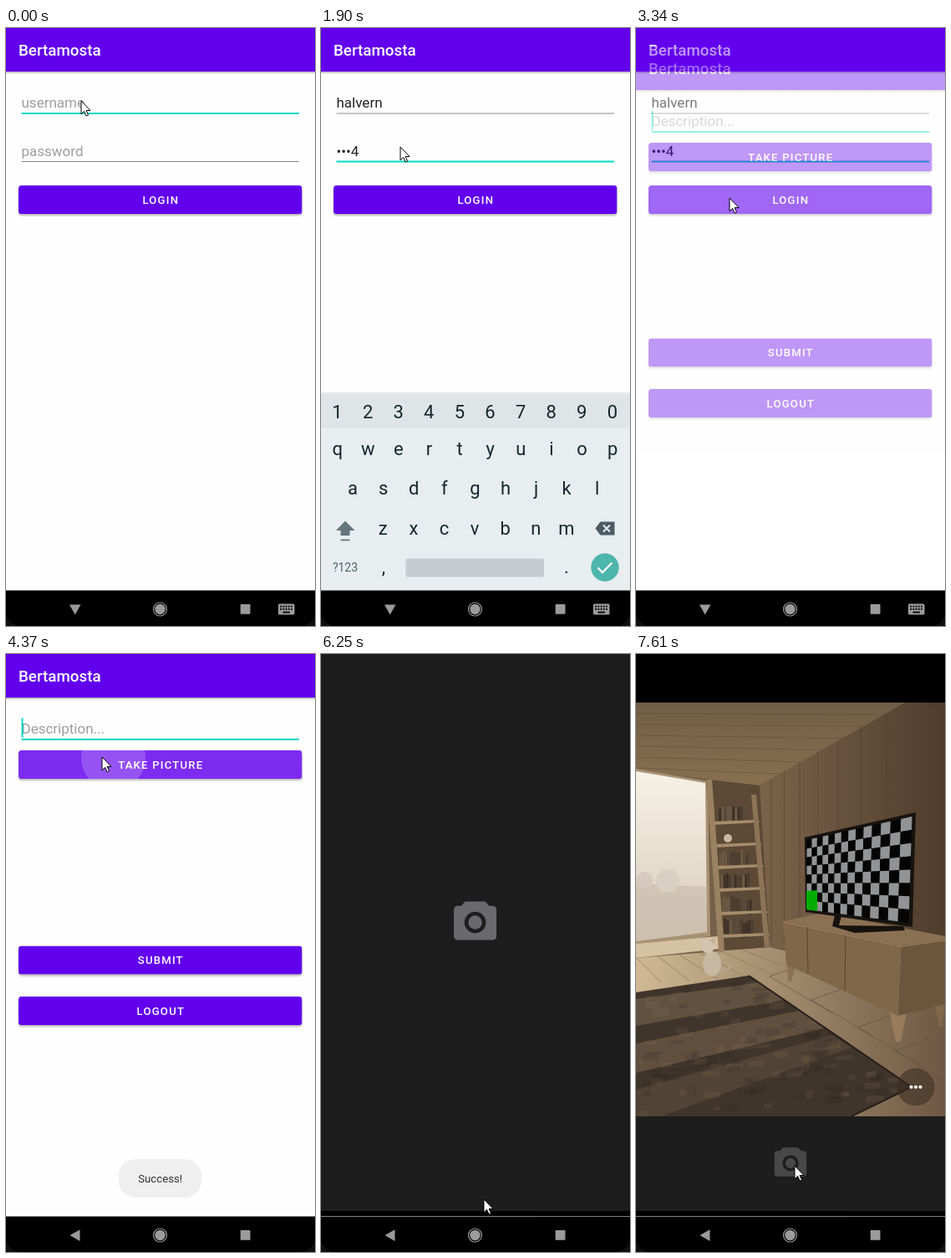
An HTML page for the animation above (8 s loop, 370 by 714 pixels).

```html
<!DOCTYPE html>
<html lang="en">
<head>
<meta charset="utf-8">
<title>Login and camera demo</title>
<style>
  html, body { margin: 0; width: 100%; height: 100%; overflow: hidden; background: #fff; }
  svg { display: block; width: 370px; height: 714px; font-family: Roboto, sans-serif; }
  .title { font-size: 18.8px; font-weight: 500; fill: #fff; }
  .field { font-size: 17px; white-space: pre; }
  .btn { font-size: 13.2px; font-weight: 500; letter-spacing: 1.18px; fill: #fff; text-anchor: middle; }
  .key { font-size: 22px; fill: #15272d; text-anchor: middle; }
  .sup { font-size: 9.5px; fill: #62737a; text-anchor: middle; }
  .sug { font-size: 17px; fill: #5b6a71; text-anchor: middle; }
</style>
</head>
<body>
<svg id="stage" viewBox="0 0 370 714" xmlns="http://www.w3.org/2000/svg"></svg>
<script>
const LOOP = 8000, PURPLE = "#6200ee", TEAL = "#03dac5";

// ---------- markup helpers ----------
const rect = (x, y, w, h, fill, extra = "") =>
  `<rect x="${x}" y="${y}" width="${w}" height="${h}" fill="${fill}" ${extra}/>`;
const poly = (points, fill, extra = "") => `<polygon points="${points}" fill="${fill}" ${extra}/>`;
const circle = (x, y, r, fill, extra = "") => `<circle cx="${x}" cy="${y}" r="${r}" fill="${fill}" ${extra}/>`;
const path = (d, stroke, width, fill = "none") =>
  `<path d="${d}" stroke="${stroke}" stroke-width="${width}" fill="${fill}"/>`;
const text = (x, y, cls, str, extra = "") => `<text x="${x}" y="${y}" class="${cls}" ${extra}>${str}</text>`;
const group = (id, body, extra = "") => `<g id="${id}" ${extra}>${body}</g>`;

let seed = 7;
const rnd = () => (seed = (seed * 16807) % 2147483647) / 2147483647;

// ---------- app screens ----------
const appBar = () =>
  rect(0, 0, 370, 671, "#fefefe") + rect(0, 50, 370, 5, "url(#shade)") +
  rect(0, 0, 370, 52, PURPLE) + text(15, 33, "title", "Bertamosta");

const field = (id, base) =>
  text(18.5, base, "field", "", `id="${id}"`) + rect(18.5, base + 6, 332.5, 2, TEAL, `id="${id}Line"`);

const button = (id, y, label) => `
  ${rect(15, y + 2, 339.5, 34, "#000", 'rx="3.5" opacity=".28" filter="url(#soft)"')}
  <clipPath id="${id}Clip">${rect(15, y, 339.5, 34, "#000", 'rx="3.5"')}</clipPath>
  <g clip-path="url(#${id}Clip)">
    ${rect(15, y, 339.5, 34, PURPLE)}
    ${rect(15, y, 339.5, 34, "#fff", `id="${id}Glow" opacity="0"`)}
    ${circle(128.5, y + 9, 0, "#fff", `id="${id}Ripple" opacity=".19"`)}
  </g>
  ${text(185.3, y + 21.9, "btn", label)}`;

// ---------- keyboard ----------
const STEP = 36.6;
const row = (chars, x0, y) => [...chars].map((c, i) => text(x0 + i * STEP, y, "key", c)).join("");

function keyboard() {
  const mic = rect(348.3, 449, 5.4, 10, "#56666d", 'rx="2.7"') +
    path("M345.5 456.5a5.5 5.5 0 0 0 11 0M351 462v4", "#56666d", 1.6);
  const smile = circle(111, 644, 8.6, "none", 'stroke="#4f6068" stroke-width="1.7"') +
    circle(108, 641.5, 1.4, "#4f6068") + circle(114, 641.5, 1.4, "#4f6068") +
    path("M106.5 646q4.5 5.5 9 0z", "none", 0, "#4f6068");
  const sups = [..."1234567890"].map((c, i) => text(32.5 + i * STEP, 494, "sup", c)).join("");
  const words = rect(130, 446, 1, 23, "#c3cacd") + rect(237, 446, 1, 23, "#c3cacd") +
    [82.5, 183.5, 284.5].map((x, i) => text(x, 464, "sug", "", `id="sug${i}"`)).join("");
  const letters = group("letters",
    rect(-12, 445.5, 31, 24, "#fff", 'rx="12"') + path("M6 452.5l5 5l-5 5", "#34454c", 2) +
    group("words", words) + mic + sups + smile + rect(138, 633.5, 129, 22, "#c6cbcf", 'rx="2"') +
    path("M331 644h12.5M338.5 638.5l5.5 5.5l-5.5 5.5M348.5 638v12", "#fff", 2.2));
  const digits = group("digits",
    row("1234567890", 19.5, 466) + rect(101.5, 633.5, 165.5, 22, "#c6cbcf", 'rx="2"') +
    path("M331.5 644.5l5.5 5.5l11.5 -11.5", "#fff", 2.3));
  return rect(0, 435, 370, 2, "#e9eaeb") + rect(0, 437, 370, 234, "#e8edf0") + rect(0, 437, 370, 41, "#dfe4e7") +
    row("qwertyuiop", 19.7, 510) + row("asdfghjkl", 38, 557) + row("zxcvbnm", 74.3, 605) +
    poly("29,588.5 40.5,600 34.5,600 34.5,606 23.5,606 23.5,600 18,600", "#65767e") +
    rect(23.5, 610.5, 11, 1.8, "#65767e") +
    poly("328.5,597.5 334.5,589.5 351.5,589.5 351.5,605.5 334.5,605.5", "#4b5b63") +
    path("M338 593.5l8 8m0-8l-8 8", "#e8edf0", 2) +
    text(29, 649, "key", "?123", 'style="font-size:14px;fill:#4f6068"') +
    text(75, 651, "key", ",") + text(294, 651, "key", ".") +
    circle(340, 644, 16.7, "#4db6ac") + letters + digits;
}

// ---------- camera ----------
const cameraIcon = (x, y, scale, id, fill, hole) =>
  `<g id="${id}" transform="translate(${x} ${y}) scale(${scale})" fill="${fill}">
    <path d="M-12 -25h24l4.8 5.2h4a4.7 4.7 0 0 1 4.7 4.7v31.5a4.7 4.7 0 0 1 -4.7 4.7h-41.600a4.700 4.700 0 0 1 -4.700 -4.700v-31.500a4.700 4.700 0 0 1 4.700 -4.700h4z"/>
    <circle r="12.8" fill="${hole}"/><circle r="8.200"/></g>`;

function shelf() {
  let s = poly("84,150 148,157 160,350 100,354", "#5c4936");
  for (const y of [201, 228, 254, 281, 309, 336]) {
    const l = 93 + (y - 200) * .07, r = 146 + (y - 200) * .09;
    if (y === 228) s += circle(110, 220, 5, "#c9b89c");
    else for (let x = l + 3; x < l + 38; x += 3.2)
      s += rect(x, y - 15 - rnd() * 5, 2.7, 18, ["#3c3028", "#4b3d31", "#6b5945", "#594a3a"][rnd() * 4 | 0]);
    s += poly(`${l},${y - 1} ${r},${y - 3} ${r + 2},${y} ${l},${y + 3}`, "#a68d6b");
  }
  return s + poly("84,150 91,150 106,355 99,357", "#9a8161") + poly("138,168 144,168 160,350 154,352", "#8d7456");
}

function screenTv() {
  const cols = 14, rows = 8, lh = 83, rh = 127;
  const at = (c, r) => {
    const u = c / cols, v = r / rows, s = u * lh / (u * lh + (1 - u) * rh);
    const top = 222 - 28 * s, bottom = 305 + 16 * s;
    return `${(204.5 + (126 - 4 * v) * s).toFixed(1)},${(top + (bottom - top) * v).toFixed(1)}`;
  };
  let s = poly("202,219 335,189 331,326 203,308", "#17130f");
  for (let c = 0; c < cols; c++) for (let r = 0; r < rows; r++)
    s += poly([at(c, r), at(c + 1, r), at(c + 1, r + 1), at(c, r + 1)].join(" "), (c + r) % 2 ? "#929394" : "#050505");
  return s + poly("204,283 217,282 217,307 204,305", "#00ad00") +
    poly("238,312 246,313 243,324 320,325 322,330 262,333 235,325", "#17120e");
}

function room() {
  let s = rect(0, 58, 370, 494, "#6d5741") +
    poly("0,58 322,58 148,157 0,139", "url(#ceil)") +
    poly("0,139 148,157 160,352 0,366", "#756049") +
    poly("148,157 322,58 370,58 370,350 160,352", "url(#wall)");
  for (let i = 1; i < 7; i++) s += path(`M0 ${58 + i * 13}L${322 - i * 25} ${58 + i * 14.2}`, "#5f4b38", .5);
  for (let i = 0; i < 9; i++) {
    const x = 162 + i * i * 1.5 + i * 14;
    s += path(`M${x} ${Math.max(58, 157 - (x - 148) * .57)}V345`, "#513f2f", .6);
  }
  // window and floor
  s += poly("0,137 86,152 89,337 0,349", "#a89274") + poly("0,140 83,154 85,332 0,343", "url(#win)") +
    poly("0,274 85,278 85,332 0,343", "#c3b6a6", 'opacity=".55"') +
    circle(10, 270, 10, "#d5cabd") + circle(38, 271, 14, "#d9cfc2") +
    poly("0,346 98,337 100,352 0,363", "#d5c2a2") +
    poly("0,363 160,350 370,400 370,552 0,552", "url(#floor)");
  for (let i = 0; i < 6; i++) s += path(`M${i * 25} ${362 - i * 2}l${30 + i * 9} 30`, "#8d7659", .7);
  for (const [x, y] of [[160, 385], [210, 413], [265, 446], [310, 474]])
    s += path(`M${x} ${y}l42 -15M${x} ${y}l75 44`, "#66523e", .7);
  s += shelf();
  // rug
  s += `<clipPath id="rugClip">${poly("0,404 135,384 330,517 258,552 0,552", "#000")}</clipPath><g clip-path="url(#rugClip)">` +
    rect(0, 380, 335, 172, "#40352b") +
    poly("0,412 150,392 184,412 0,444", "#695845", 'opacity=".8"') +
    poly("0,465 200,425 225,447 0,500", "#75624c", 'opacity=".6"') +
    poly("0,520 235,455 258,470 30,552 0,552", "#59493a", 'opacity=".7"');
  for (let i = 0; i < 150; i++)
    s += rect(rnd() * 320, 388 + rnd() * 160, 8 + rnd() * 14, 4 + rnd() * 6,
      rnd() < .5 ? "#8b765c" : "#211b17", 'opacity=".14" transform="skewY(-4)"');
  s += "</g>" + path("M135 384L330 517L258 552", "#261f19", 2);
  // small figure by the window
  s += path("M100 377q14 2 12-6", "#b4a48e", 3) + `<ellipse cx="91" cy="370" rx="11" ry="15" fill="#c7b8a2"/>` +
    circle(86, 349, 8, "#d2c4af") + poly("78,346 77,338 84,342", "#d2c4af") + poly("88,342 95,338 94,347", "#bfae97");
  // cabinet
  s += poly("181,368 191,373 186,391 182,391", "#8c7152") + poly("303,425 324,427 317,463 311,463", "#987b5b") +
    poly("357,418 370,414 367,445 363,445", "#80674a") +
    poly("176,319 225,309 370,337 370,342 318,348", "#8b7153") +
    poly("176,319 318,348 314,432 180,371", "#806749") +
    poly("318,348 370,341 370,418 314,432", "#6c553d") +
    path("M205 326l1 56M251 335l-1 67", "#58442f", 1) + path("M176 320L318 349L370 342", "#a18464", 1);
  return s + screenTv();
}

const cameraView = () => rect(0, 0, 370, 671, "#000") + rect(0, 0, 370, 665, "#1d1d1d") +
  cameraIcon(184.600, 320.500, 1, "cover", "#6a6a6e", "#1d1d1d");

const preview = () => rect(0, 0, 370, 665, "#000") +
  `<g clip-path="url(#picClip)">${room()}</g>` +
  circle(335, 517, 22.5, "#3a2d21", 'opacity=".55"') +
  [329.5, 335, 340.5].map(x => circle(x, 517, 2.1, "#fff")).join("") +
  rect(0, 552, 370, 113, "#1d1d1d", 'id="bar"') + cameraIcon(185, 608, .75, "shutter", "#484848", "#1d1d1d");

// ---------- system bar ----------
function navBar() {
  const g = "#9b9b9b";
  let keys = rect(326, 687.5, 19.5, 13, g, 'rx="1.5"');
  for (let r = 0; r < 2; r++) for (let c = 0; c < 5; c++) keys += rect(328.2 + c * 3.2, 689.7 + r * 3.2, 1.9, 1.9, "#000");
  keys += rect(331.5, 696.7, 8.500, 1.8, "#000");
  return rect(0, 671.500, 370, 43, "#000") +
    poly("76,688.5 89.500,688.5 82.700,700.500", g, 'id="down"') + poly("88.500,687.200 88.500,701 76.500,694", g, 'id="back"') +
    circle(184.5, 694, 8, "none", `stroke="${g}" stroke-width="1.2"`) + circle(184.5, 694, 6.2, g) +
    rect(280.700, 688, 11.8, 11.8, g, 'rx=".8"') + group("ime", keys) +
    path("M0 700q3 11 14 14h-14zM370 700q-3 11 -14 14h14z", "none", 0, "#101010");
}

const grad = (id, a, b, dir) => `<linearGradient id="${id}" ${dir}><stop stop-color="${a}"/><stop offset="1" stop-color="${b}"/></linearGradient>`;
const DOWN = 'x2="0" y2="1"', ACROSS = 'x2="1" y2="0"';

document.getElementById("stage").innerHTML = `<defs>
  ${grad("shade", "#777", "#fefefe", DOWN)}${grad("ceil", "#725d47", "#88704f", DOWN)}
  ${grad("wall", "#7b634a", "#4f3c2c", ACROSS)}${grad("win", "#f7f1e6", "#d8cbb8", DOWN)}
  ${grad("floor", "#d0b993", "#6e5843", ACROSS)}
  <filter id="soft" x="-5%" y="-30%" width="110%" height="160%"><feGaussianBlur stdDeviation="1"/></filter>
  <clipPath id="picClip">${rect(0, 58, 370, 494, "#000")}</clipPath>
  <clipPath id="appClip">${rect(0, 0, 370, 671.500, "#000")}</clipPath></defs>
  <g clip-path="url(#appClip)">
  ${group("loginView", appBar() + field("user", 95) + field("pass", 152.5) + button("login", 188, "LOGIN"))}
  ${group("kb", keyboard())}
  ${group("form", appBar() + field("desc", 95) + rect(18.5, 76.500, 2, 23, TEAL, 'id="caret"') +
    button("take", 115, "TAKE PICTURE") + button("submit", 348.5, "SUBMIT") + button("logout", 409, "LOGOUT"))}
  ${group("toast", rect(135, 603, 99, 46, "#efefef", 'rx="20"') +
    text(184.7, 631, "", "Success!", 'font-size="13.2" fill="#323232" text-anchor="middle"'))}
  ${group("cam", cameraView())}${group("photo", preview())}
  </g>${group("nav", navBar())}
  ${group("pointer", poly("0,0 0,15.8 3.6,12.4 6.2,18 8.6,16.9 6.1,11.5 11,11.5", "#fff", 'stroke="#000" stroke-width="1"'))}`;

// ---------- timeline: each step changes part of the state ----------
const steps = [
  [0, { user: "", pass: "", focus: "user", kb: 0, num: 0, ime: 1, x: 90, y: 87, login: 0, loginR: 0, form: 0, dy: 0,
        take: 0, takeR: 0, toast: 0, caret: 1, cam: 0, photo: 0, bar: "#1d1d1d", icon: "#e6e6e6" }],
  [310, { kb: 1 }],
  [440, { user: "h" }],
  [570, { user: "hal" }],
  [700, { user: "halve" }],
  [850, { user: "halvern" }],
  [1090, { x: 95, y: 142 }],
  [1240, { focus: "pass" }],
  [1370, { num: 1 }],
  [1500, { pass: "1" }],
  [1630, { pass: "•2" }],
  [1770, { pass: "••3" }],
  [1900, { pass: "•••4" }],
  [2190, { x: 102, y: 168 }],
  [2320, { x: 112, y: 203 }],
  [2440, { login: .06, loginR: 45 }],
  [2570, { login: .13, loginR: 0 }],
  [3070, { login: .05 }],
  [3200, { login: 0, kb: .5 }],
  [3330, { kb: 0, form: .4, dy: 22 }],
  [3470, { form: 1, dy: 0, ime: 0 }],
  [3600, { toast: .5, y: 180 }],
  [3740, { toast: .9, x: 114, y: 150 }],
  [3870, { toast: 1, y: 138 }],
  [4120, { x: 115, y: 123 }],
  [4240, { take: .1, takeR: 20 }],
  [4370, { take: .17, takeR: 38.5 }],
  [4490, { takeR: 90 }],
  [4800, { take: .07, takeR: 0 }],
  [5220, { x: 122, y: 170 }],
  [5350, { x: 145, y: 310 }],
  [5480, { x: 172, y: 480 }],
  [5620, { x: 188, y: 600 }],
  [5750, { x: 194, y: 640 }],
  [5880, { x: 195, y: 650, toast: .7 }],
  [6010, { toast: .3 }],
  [6130, { toast: 0, cam: .6 }],
  [6250, { cam: 1, y: 651 }],
  [6500, { photo: .35 }],
  [6640, { photo: .75, x: 194, y: 640 }],
  [6770, { photo: 1, x: 192, y: 626 }],
  [7070, { x: 190, y: 611 }],
  [7200, { bar: "#343434" }],
  [7340, { bar: "#2a2a2a", icon: "#a8a8a8" }],
  [7480, { bar: "#222222", icon: "#707070" }],
  [7610, { bar: "#1d1d1d", icon: "#484848" }]
];
let last = {};
const states = steps.map(([t, change]) => [t, last = { ...last, ...change }]);

// ---------- rendering ----------
const $ = id => document.getElementById(id);
const set = (id, attrs) => { for (const k in attrs) $(id).setAttribute(k, attrs[k]); };
const show = (id, on) => set(id, { opacity: +on });

function drawField(id, value, hint, base, focused) {
  $(id).textContent = value || hint;
  set(id, { fill: value ? "#212121" : "#9d9d9d" });
  set(id + "Line", { y: base + (focused ? 6 : 6.500), height: focused ? 2 : 1, fill: focused ? TEAL : "#8c8c8c" });
}

function draw(s) {
  const onUser = s.focus === "user";
  drawField("user", s.user, "username", 95, onUser);
  drawField("pass", s.pass, "password", 152.5, !onUser);
  drawField("desc", "", "Description...", 95, true);
  set("user", { "text-decoration": onUser && s.user ? "underline" : "none" });
  const cap = s.user.charAt(0).toUpperCase() + s.user.slice(1);
  [s.user, cap, cap + "'s"].forEach((w, i) => $("sug" + i).textContent = w);
  show("words", s.user);
  show("words", s.user.length > 0);
  show("letters", !s.num);
  show("digits", s.num);
  set("kb", { transform: `translate(0 ${(1 - s.kb) * 240})` });
  for (const b of ["login", "take"]) {
    set(b + "Glow", { opacity: s[b] });
    set(b + "Ripple", { r: s[b + "R"] });
  }
  show("form", s.form);
  set("form", { transform: `translate(0 ${s.dy})` });
  for (const id of ["toast", "caret", "cam", "photo", "ime"]) show(id, s[id]);
  show("down", s.ime);
  show("back", !s.ime);
  set("bar", { fill: s.bar });
  set("shutter", { fill: s.icon });
  $("shutter").firstElementChild.nextElementSibling.setAttribute("fill", s.bar);
  set("pointer", { transform: `translate(${s.x} ${s.y})` });
}

const start = performance.now();
let shown = -1;
function tick() {
  const t = (performance.now() - start) % LOOP;
  let i = states.length - 1;
  while (states[i][0] > t) i--;
  if (i !== shown) draw(states[shown = i][1]);
  requestAnimationFrame(tick);
}
tick();
</script>
</body>
</html>
```
